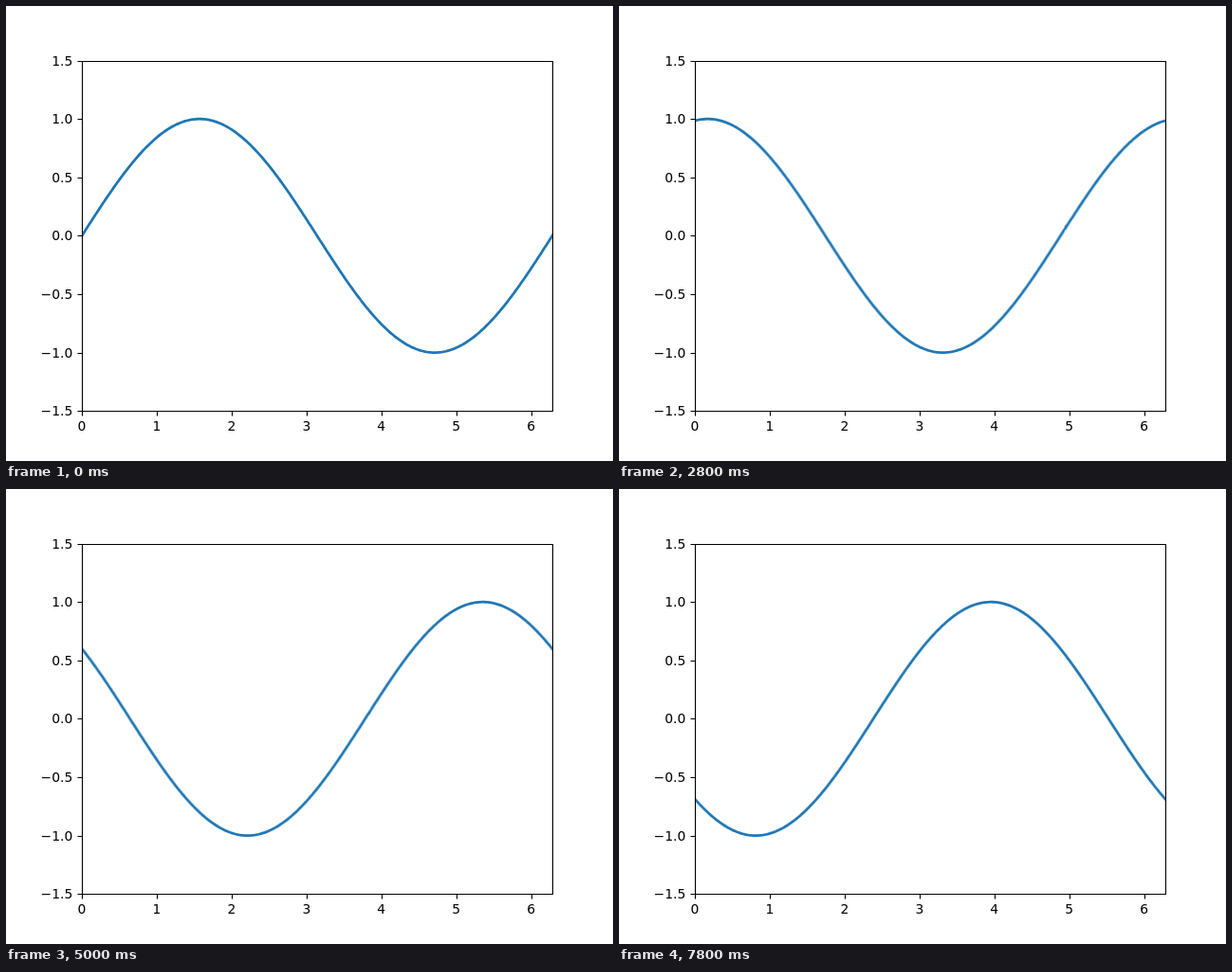
Write an HTML page that moves like this. It is 640x480 px and loops after 8 s.

```html
<!DOCTYPE html>
<html lang="en">
<head>
<meta charset="utf-8">
<title>Travelling sine wave</title>
<style>
  html, body { margin: 0; width: 100%; height: 100%; overflow: hidden; background: #fff; }
  svg { display: block; }
  text { font: 13.889px "DejaVu Sans", sans-serif; fill: #000; }
  .axis { fill: none; stroke: #000; stroke-width: 1.111; }
  .wave { fill: none; stroke: #1f77b4; stroke-width: 2.778; stroke-linejoin: round; }
</style>
</head>
<body>
<svg id="plot" width="640" height="480" viewBox="0 0 640 480">
  <clipPath id="area"><rect x="80" y="57" width="497" height="371"/></clipPath>
  <g clip-path="url(#area)"><path id="wave" class="wave"/></g>
</svg>
<script>
  const LEFT = 80, RIGHT = 576, TOP = 57.6, BOTTOM = 427.2;
  const STEPS = 40, STEP_MS = 200, PHASE_STEP = 0.1;
  const plot = document.getElementById('plot');
  const wave = document.getElementById('wave');

  const unit = (RIGHT - LEFT) / (2 * Math.PI);
  const px = x => LEFT + x * unit;
  const py = y => TOP + (1.5 - y) / 3 * (BOTTOM - TOP);
  const snap = v => Math.floor(v + 0.5) + 0.5;

  function add(tag, attrs, content = '') {
    const el = document.createElementNS(plot.namespaceURI, tag);
    for (const name in attrs) el.setAttribute(name, attrs[name]);
    el.textContent = content;
    plot.append(el);
  }

  const label = (x, y, anchor, content) =>
    add('text', { x, y, 'text-anchor': anchor }, content);

  const x0 = snap(LEFT), x1 = snap(RIGHT), y0 = snap(TOP), y1 = snap(BOTTOM);
  let axes = `M${x0} ${y0}H${x1}V${y1}H${x0}Z`;

  for (let x = 0; x <= 6; x++) {
    axes += `M${snap(px(x))} ${y1}v5`;
    label(px(x), 448, 'middle', x);
  }
  for (let y = -1.5; y <= 1.5; y += 0.5) {
    axes += `M${x0} ${snap(py(y))}h-5`;
    label(70.3, Math.round(py(y) + 5), 'end', y.toFixed(1).replace('-', '\u2212'));
  }
  add('path', { d: axes, class: 'axis' });

  // The curve runs past the right edge so it can slide left by the whole phase.
  const shift = STEPS * PHASE_STEP;
  const points = [];
  for (let x = -0.1; x < 2 * Math.PI + shift + 0.1; x += 0.02) {
    points.push(px(x).toFixed(2) + ' ' + py(Math.sin(x)).toFixed(2));
  }
  wave.setAttribute('d', 'M' + points.join('L'));

  wave.animate(
    { transform: ['translateX(0px)', `translateX(${-shift * unit}px)`] },
    { duration: STEPS * STEP_MS, iterations: Infinity, easing: `steps(${STEPS}, end)` }
  );
</script>
</body>
</html>
```
